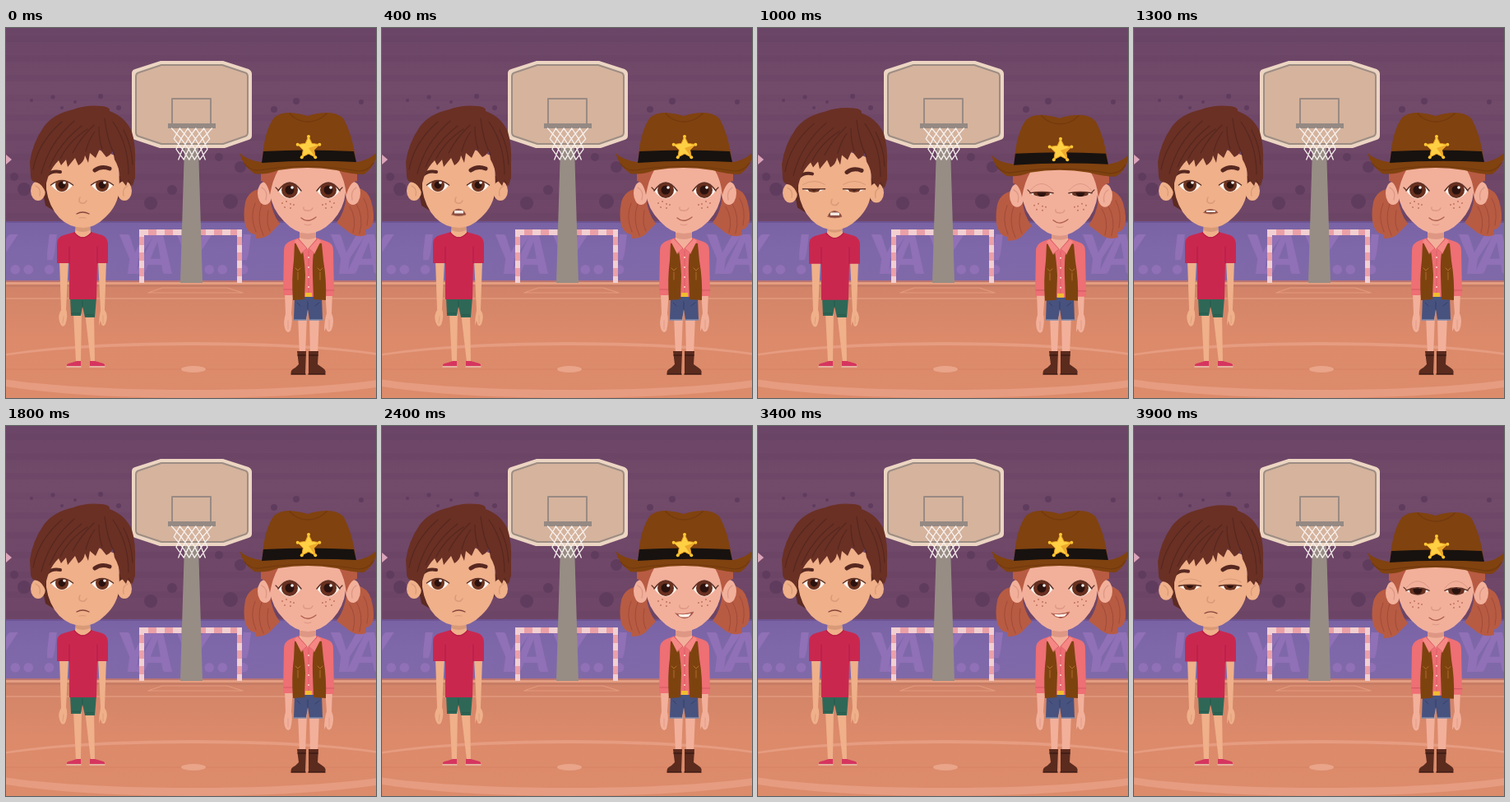
These frames come from a looping animation (450 px wide and 450 px high, 4 s). An HTML page with a canvas:

```html
<!DOCTYPE html>
<html lang="en">
<head>
<meta charset="utf-8">
<title>Two kids on a court</title>
<style>
html, body { margin: 0; width: 100%; height: 100%; overflow: hidden; background: #6b4669; }
canvas { display: block; width: 450px; height: 450px; }
</style>
</head>
<body>
<canvas id="stage" width="450" height="450"></canvas>
<script>
const c = document.getElementById('stage').getContext('2d');
const LOOP = 4000, STEP = 100;
const SKIN = '#efb08a', SHADE = '#d99a78', GIRL_SKIN = '#f2b09b', GIRL_SHADE = '#dd9784';

function fill(d, color) {
  c.fillStyle = color;
  c.fill(new Path2D(d));
}
function line(d, color, width = 1) {
  c.strokeStyle = color;
  c.lineWidth = width;
  c.lineCap = c.lineJoin = 'round';
  c.stroke(new Path2D(d));
}
function oval(x, y, rx, ry, color) {
  c.fillStyle = color;
  c.beginPath();
  c.ellipse(x, y, rx, ry, 0, 0, Math.PI * 2);
  c.fill();
}
function rect(x, y, w, h, color) {
  c.fillStyle = color;
  c.fillRect(x, y, w, h);
}
function vertical(y0, y1, ...colors) {
  const g = c.createLinearGradient(0, y0, 0, y1);
  colors.forEach((color, i) => g.addColorStop(i / (colors.length - 1), color));
  return g;
}
function shifted(dx, dy, draw) {
  c.save();
  c.translate(dx, dy);
  draw();
  c.restore();
}
const mix = (a, b, k) => a + (b - a) * k;

// Linear interpolation through [time, value] keys
function track(t, keys) {
  for (let i = 1; i < keys.length; i++) {
    const [t0, a] = keys[i - 1], [t1, b] = keys[i];
    if (t <= t1) return mix(a, b, Math.max(0, (t - t0) / (t1 - t0)));
  }
  return keys[keys.length - 1][1];
}

function drawWall() {
  rect(0, 0, 450, 236, vertical(0, 236, '#6b4567', '#734b6a', '#6f4768', '#6f4667'));
  for (let y = 9; y < 230; y += 24) rect(0, y, 450, 8, 'rgba(80,45,85,.08)');
  const spots = [[31, 88, 2], [57, 84, 2.5], [68, 97, 2], [84, 90, 2], [115, 83, 3], [137, 97, 3],
    [326, 99, 4], [353, 89, 4], [432, 90, 3], [22, 196, 8], [10, 181, 5], [176, 213, 8],
    [202, 197, 6], [259, 157, 5], [285, 169, 7], [273, 211, 9]];
  for (const [x, y, r] of spots) oval(x, y, r, r, '#5f3c5e');
  fill('M0 154L7 160L0 166Z', '#dca3b9');
  rect(0, 235, 450, 73, vertical(235, 308, '#7a63a4', '#7e68aa', '#8069a8'));
  rect(0, 235, 450, 2, '#6d5494');
  c.fillStyle = '#9070b6';
  c.font = 'italic 900 66px Lato, sans-serif';
  for (const x of [-101, 135, 392]) {
    [['Y', 0], ['A', 25], ['Y', 70], ['.', 106], ['.', 122], ['!', 146]]
      .forEach(([letter, dx]) => c.fillText(letter, x + dx, 299));
  }
}

function drawFloor() {
  rect(0, 307, 450, 143, vertical(307, 450, '#d18368', '#dc8a6a', '#dc8b6b'));
  rect(0, 307, 450, 2, '#b97572');
  rect(0, 309, 450, 3, '#e49d80');
  rect(0, 312, 450, 3, '#c67c65');
  line('M0 329H450', '#e39a7e', 1.5);
  line('M190 316H269L288 322H173Z', '#e39a7e', 1.2);
  line('M0 415H450', '#d78264', 1);
  c.beginPath();
  c.ellipse(228, 416, 282, 34, 0, 0, Math.PI * 2);
  c.ellipse(228, 413, 270, 27, 0, 0, Math.PI * 2);
  c.fillStyle = '#e69c80';
  c.fill('evenodd');
  oval(228, 415, 15, 4, '#e9a489');
}

function drawGoal() {
  const white = '#f2cfd2', pink = '#eba0a8';
  rect(162, 245, 125, 7, white);
  for (let x = 173; x < 280; x += 20) rect(x, 245, 10, 7, pink);
  for (const x of [162, 281]) {
    rect(x, 245, 6, 65, white);
    for (let y = 254; y < 308; y += 19) rect(x, y, 6, 10, pink);
  }
}

function drawHoop() {
  fill('M217 145H234L239 310H212Z', '#978d85');
  fill('M157 50L188 40H264L295 50Q299 52 299 56V131Q299 135 295 136L266 146H187L157 136Q153 135 153 131V55Q153 51 157 50Z', '#ecd5c2');
  const board = 'M162 54L189 45H263L290 54Q294 55 294 59V127Q294 131 290 132L264 141H189L162 132Q158 131 158 127V59Q158 55 162 54Z';
  fill(board, '#d5b39d');
  line(board, '#9d8d83', 2);
  line('M202 86H249V118H202Z', '#9a8a83', 2);
  rect(197, 116, 58, 6, '#958983');
  let net = '';
  const at = (u, v) => `${226 + (u - 2.5) * (9.8 - v * 1.1)} ${122 + v * 12.7}`;
  for (let v = 0; v < 3; v++) {
    for (let u = 0; u < 5; u++) net += `M${at(u, v)}L${at(u + 1, v + 1)}M${at(u + 1, v)}L${at(u, v + 1)}`;
  }
  line(net, '#f7f1ee', 1.3);
}

// Eye narrowing to a slit as closed goes from 0 to 1
function drawEye(x, y, e, closed) {
  const cy = y + e.sink * closed;
  const top = cy + mix(e.top, e.shutTop, closed);
  const bottom = cy + mix(e.bottom, e.shutBottom, closed);
  const left = x - e.w, right = x + e.w;
  const lid = `M${left} ${cy}Q${x} ${top} ${right} ${cy}`;
  c.save();
  c.clip(new Path2D(`${lid}Q${x} ${bottom} ${left} ${cy}Z`));
  rect(left, y - 20, e.w * 2, 40, '#fdf5ee');
  oval(x, y + e.iy, e.r, e.r, e.iris);
  oval(x, y + e.iy, e.r * .55, e.r * .55, '#2b120e');
  oval(x + 3, y + e.iy - 3, 1.8, 1.8, '#fff');
  c.restore();
  line(lid, '#5c3025', 1.5);
  if (closed > 0) line(`M${left} ${y - 3}Q${x} ${y + e.top} ${right} ${y - 3}`, e.crease, 1);
}

const boyEye = { w: 13.5, top: -11, bottom: 17, shutTop: 3, shutBottom: 6, sink: 3,
  r: 8, iy: 0, iris: '#6d3420', crease: SHADE };
const girlEye = { w: 14, top: -20, bottom: 19, shutTop: 2, shutBottom: 6, sink: 0,
  r: 10, iy: -1, iris: '#69301f', crease: GIRL_SHADE };

function drawBoyLegs() {
  fill('M82 346H92L91 406H85Z', SKIN);
  fill('M96 346H107L108 406H103Z', SKIN);
  fill('M86 405H91V411H74Q73 408 80 407Z', '#d6355f');
  fill('M102 405H108L115 407Q121 408 120 411H102Z', '#d6355f');
  line('M74 412H91M102 412H120', '#f1d6d2', 1.2);
  fill('M78 327H110L108 352H96L93 338L91 350H79Z', '#2f6756');
  line('M93 332V340M80 347L91 347M97 349H107', '#25574a', 1);
}

function drawBoyTop() {
  fill('M65 283H76L73 342Q76 350 72 361Q68 366 65 357Q63 349 67 343Z', SKIN);
  fill('M112 283H122L120 343Q125 350 121 360Q117 366 115 356L113 362Q113 352 115 343Z', SKIN);
  line('M70 351L69 359M118 350L118 359', SHADE, .8);
  fill('M84 248Q93 251 103 248L117 252Q124 255 124 263V286H111L110 330H77V286H62V263Q62 254 70 252Z', '#ca274f');
  line('M77 266V286M111 266V286', '#aa1f46', 1);
  fill('M85 238H102L103 249Q93 260 84 249Z', SKIN);
  fill('M85 240H102V246Q93 250 85 246Z', SHADE);
  line('M83 249Q93 261 104 249', '#b82045', 1.3);
}

function drawBoyMouth(open) {
  if (!open) {
    line('M86 226Q93 222 101 226', '#84443a', 1.3);
    line('M89 231Q93 230 97 231', SHADE, 1);
    return;
  }
  const low = 224 + open * 4;
  const d = `M85 ${low - 1}Q86 221 93 ${221 - open}Q100 221 102 ${low - 1}Q93 ${low + 2} 85 ${low - 1}Z`;
  fill(d, '#8a4b40');
  rect(88, 222, 11, 1 + open * 2.5, '#f5ebe4');
  line(d, '#a8664f', .8);
}

function drawBoyHead(closed, open) {
  fill('M34 180L42 207L46 206L48 216L58 222L60 160H130L134 208L143 206L144 211L150 201L155 180Z', '#5c2a22');
  oval(39, 198, 9, 12, SKIN);
  oval(144, 198, 9, 12, SKIN);
  line('M36 192Q43 195 41 204M148 192Q141 195 143 204', SHADE, 1.3);
  fill('M49 158Q90 135 137 157L138 196Q136 216 121 230Q108 243 94 243Q77 243 65 231Q52 217 49 196Z', SKIN);
  drawEye(68, 191, boyEye, closed);
  drawEye(117, 191, boyEye, closed);
  line('M90 206Q87 212 92 213Q96 214 98 210', SHADE, 1.5);
  drawBoyMouth(open);
  line('M108 173Q116 167 126 171', '#572820', 5);
  line('M51 178Q57 173 66 175', '#572820', 4);
  fill('M48 200Q44 190 38 188Q30 187 30 180L29 163Q32 140 46 120Q58 104 82 99Q97 93 117 95Q127 96 126 101Q145 108 153 126Q158 142 157 165V182L154 192L149 184L146 192L139 183Q138 170 132 160L130 149Q128 154 122 157L114 147L109 158L102 152L100 164L96 155Q95 163 88 167L84 158L75 169L73 160L67 167L64 161Q57 168 53 177Q48 187 48 200Z', '#6a3024');
  line('M33 172Q39 139 68 114M43 177Q52 140 83 113M53 169Q65 140 92 119M66 159Q76 138 99 123M81 152Q91 133 107 118M97 150Q101 135 108 126M117 147Q113 136 113 120M132 154Q123 137 120 110M149 178Q149 141 130 114M154 166Q153 143 143 124', '#552720', 1.2);
}

function drawGirlLegs() {
  fill('M355 350H366L364 397H357Z', GIRL_SKIN);
  fill('M369 350H381L379 397H370Z', GIRL_SKIN);
  fill('M354 393H365L364 421H347Q345 416 352 413L356 409Z', '#5b2b1e');
  fill('M368 393H380L379 409L386 414Q390 417 388 421H368Z', '#5b2b1e');
  line('M347 421H364M368 421H388M355 398H364M369 398H379', '#3d1b15', 1.5);
  fill('M351 326H384L385 355H369L367 341L365 355H350Z', '#47527f');
  line('M350 355H365M369 355H385', '#7f8cac', 1.4);
  line('M367 333V343M354 334L358 338M376 338L381 334', '#363f68', 1);
}

function drawGirlTop() {
  fill('M339 320H349L347 347Q349 356 346 368Q342 373 339 365Q337 357 340 348Z', GIRL_SKIN);
  fill('M388 320H397L396 347Q400 356 396 367Q392 373 389 365L387 369Q387 356 390 347Z', GIRL_SKIN);
  line('M343 356V366M393 355V366', GIRL_SHADE, .8);
  fill('M357 255L377 255L391 260Q398 262 398 271L399 326H387L385 278V327H350V280L349 325H337L338 271Q338 262 346 259Z', '#ee6f74');
  line('M338 318H349M387 319H399', '#d45a65', 1.2);
  fill('M357 248H377V257L367 269L357 257Z', GIRL_SKIN);
  fill('M357 249H377V255Q367 259 357 255Z', GIRL_SHADE);
  fill('M351 262L359 261Q363 278 364 300L363 330L349 331Q347 305 350 283Z', '#7d430f');
  fill('M384 262L376 261Q372 280 373 302L374 330L389 331Q390 306 386 283Z', '#7d430f');
  fill('M355 256L366 268L359 275L351 259Z', '#f58784');
  fill('M379 256L368 268L375 275L383 259Z', '#f58784');
  line('M355 256L366 268L359 274M379 256L368 268L375 274M368 271V322', '#d35b63', .8);
  for (let y = 279; y < 320; y += 12) oval(368, y, 1, 1, '#ffd7c6');
  for (const x of [355, 382]) line(`M${x - 3} 292L${x} 295L${x + 3} 292M${x} 297V306`, '#b06d2a', 1);
  rect(364, 322, 8, 5, '#f0bc31');
}

function drawGirlMouth(open) {
  if (!open) {
    line('M359 231Q367 238 377 230', '#b0604f', 1.3);
    line('M363 239Q367 241 371 239', GIRL_SHADE, 1);
    return;
  }
  const low = 229 + open * 6;
  const d = `M357 228Q367 230 379 226Q376 ${low} 368 ${low + 1}Q361 ${low} 357 228Z`;
  fill(d, '#a1483e');
  fill(`M360 228.5Q367 230 376 228L373 ${low - 1}Q367 ${low} 362 ${low - 1}Z`, '#fff4eb');
  line(d, '#b96a57', .9);
}

function drawStar() {
  const points = [];
  for (let i = 0; i < 10; i++) {
    const a = -Math.PI / 2 + i * Math.PI / 5, r = i % 2 ? 7 : 14;
    points.push([368 + Math.cos(a) * r, 146 + Math.sin(a) * r]);
  }
  const d = 'M' + points.map(p => p.join(' ')).join('L') + 'Z';
  fill(d, '#ffd043');
  line(d, '#e59b21', 1);
  points.forEach(([x, y], i) => i % 2 || oval(x, y, 2, 2, '#ffc832'));
  fill(`M${points[2]}L${points[3]}L${points[4]}L368 146Z`, '#edaa2a');
}

function drawGirlHead(closed, open) {
  fill('M308 196Q295 198 291 212Q288 228 291 240Q296 252 304 251L304 256Q318 256 324 247L333 238Q323 225 321 205Z', '#b85b43');
  fill('M427 194Q440 197 444 210Q449 228 446 238Q442 246 437 245L438 252Q424 256 414 246L402 237Q412 224 414 205Z', '#b85b43');
  line('M303 213Q296 230 304 248M311 214Q304 233 313 252M319 222Q316 238 321 247M425 212Q436 229 430 250M418 217Q427 231 422 249M435 207Q443 221 439 240', '#a04b39', 1);
  oval(315, 201, 9, 14, GIRL_SKIN);
  oval(422, 201, 9, 14, GIRL_SKIN);
  line('M311 194Q319 198 316 209M426 194Q419 198 421 209', GIRL_SHADE, 1.3);
  fill('M321 165H415L413 200Q411 220 397 235Q382 250 367 250Q352 250 338 235Q323 220 321 200Z', GIRL_SKIN);
  fill('M310 173H331Q324 185 321 203Q318 187 310 186Z', '#b85b43');
  fill('M427 173H405Q412 185 414 203Q418 187 427 186Z', '#b85b43');
  drawEye(345, 198, girlEye, closed);
  drawEye(392, 198, girlEye, closed);
  line('M331 197L328 194M406 197L409 194', '#5c3025', 1.2);
  for (const [x, y] of [[336, 213], [341, 211], [346, 214], [339, 218], [346, 219], [350, 215]]) {
    oval(x, y, 1, 1, '#c3735b');
    oval(735 - x, y, 1, 1, '#c3735b');
  }
  line('M362 218Q361 222 366 222Q371 223 373 219', GIRL_SHADE, 1.4);
  drawGirlMouth(open);
  fill('M312 155Q315 124 326 109Q334 102 346 103Q358 104 367 107Q378 103 391 103Q404 103 411 111Q421 130 425 157V163H312Z', '#80420f');
  line('M345 104Q354 114 367 114Q380 114 390 104', '#733a0e', 1.5);
  fill('M284 152Q293 161 311 163Q367 160 426 163Q442 161 451 151Q449 170 435 178Q420 178 402 173Q367 167 331 173Q316 179 302 177Q289 169 284 152Z', '#80420f');
  line('M290 165Q297 174 308 173Q367 163 428 174Q441 174 447 164', '#70380d', 1.2);
  fill('M313 150Q367 147 423 150L426 163Q367 160 311 164Z', '#17120f');
  drawStar();
}

function drawBoy(closed, open) {
  const drop = closed * 3;
  drawBoyLegs();
  shifted(0, drop * .3, drawBoyTop);
  shifted(0, drop, () => drawBoyHead(closed, open));
}
function drawGirl(closed, open) {
  const drop = closed * 3.5;
  drawGirlLegs();
  shifted(0, drop * .3, drawGirlTop);
  shifted(0, drop, () => drawGirlHead(closed, open));
}

// One blink, repeated at each start time
const BLINK = [[0, 0], [100, .08], [200, .8], [300, 1], [400, .6], [500, 0]];
const BLINK_STARTS = [800, 3500];
const BOY_TALK = [.3, .4, .7, .5, 1, .6];
const GIRL_TALK = [.65, .4, .75, .3, .6, .8];

function speech(step, first, last, shapes) {
  return step >= first && step <= last ? shapes[step % shapes.length] : 0;
}

function frame(now) {
  const step = Math.floor((now % LOOP) / STEP);
  const closed = Math.max(...BLINK_STARTS.map(t => track(step * STEP - t, BLINK)));
  drawWall();
  drawFloor();
  drawGoal();
  drawHoop();
  drawBoy(closed, speech(step, 2, 17, BOY_TALK));
  drawGirl(closed, speech(step, 19, 36, GIRL_TALK));
}

let start;
function loop(now) {
  start ??= now;
  frame(Math.max(0, now - start));
  requestAnimationFrame(loop);
}
requestAnimationFrame(loop);
</script>
</body>
</html>
```
